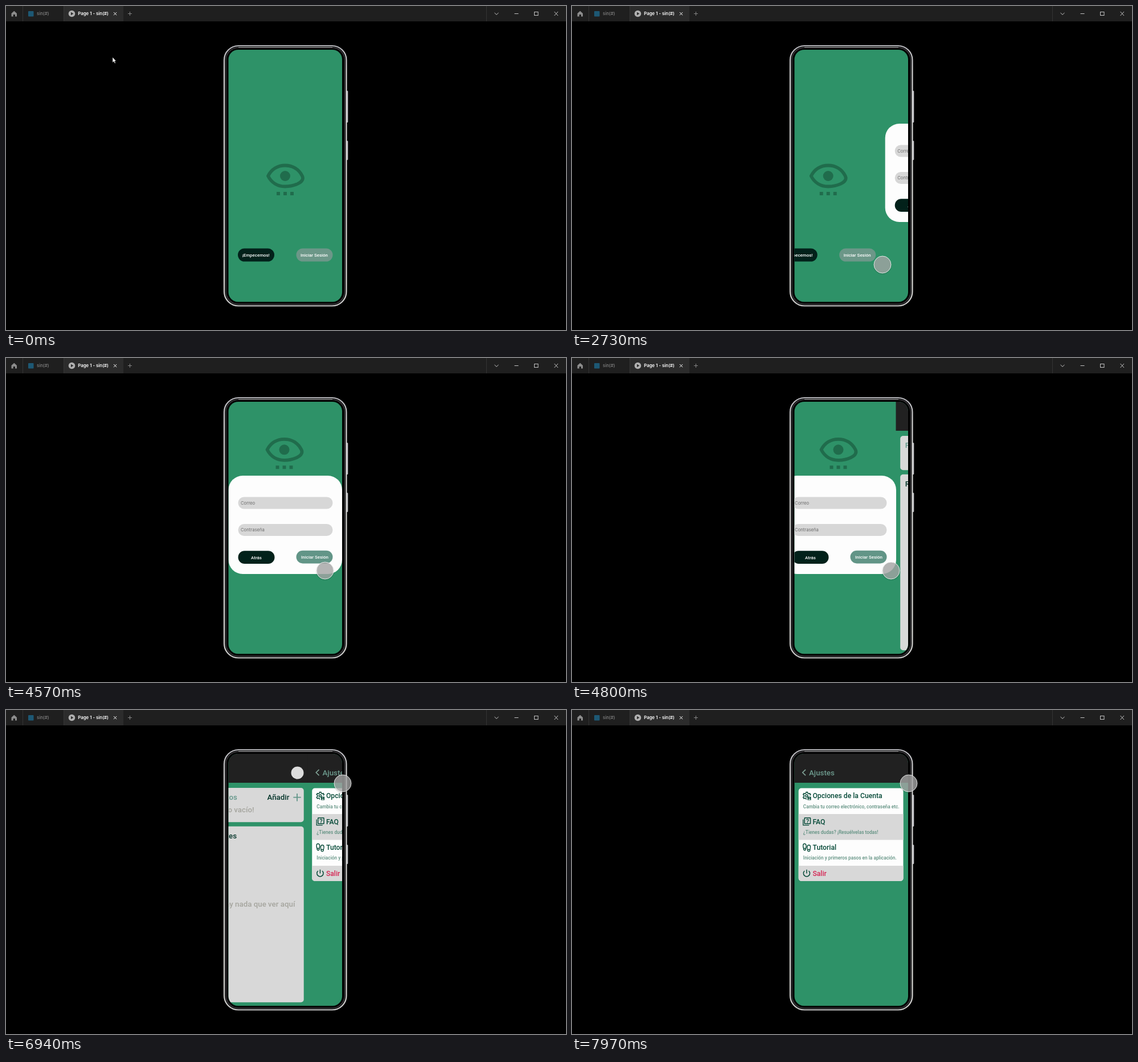
Animation, 983 px wide and 570 px high, one loop 8 s. Source, as an HTML page:

```html
<!DOCTYPE html>
<html lang="es">
<head>
<meta charset="utf-8">
<title>App prototype</title>
<style>
  html, body { margin: 0; width: 100%; height: 100%; overflow: hidden; background: #000; }
  svg { display: block; width: 100%; height: 100%; }
  text { font-family: Roboto, sans-serif; font-weight: 500; white-space: pre; }
  .bar text { font: 600 7.8px Inter, sans-serif; }
  .button { font-size: 7.9px; fill: #fff; text-anchor: middle; }
  .field { font: 400 7.7px Inter, sans-serif; fill: #6b6b6b; }
  .heading { font-size: 13.3px; }
  .item { font-size: 12.2px; fill: #064a38; }
  .note { font-size: 8.3px; fill: #5f9080; }
  .line { fill: none; stroke: #064a38; stroke-width: 1.5; }
  .muted { fill: #a5a59e; }
  .dark { fill: #05352a; }
</style>
</head>
<body>
<svg viewBox="0 0 983 570">
  <defs>
    <clipPath id="screen"><rect x="390.5" y="77" width="199.5" height="443.5" rx="17"/></clipPath>
    <linearGradient id="metal" x2="0" y2="1">
      <stop offset="0" stop-color="#b9b9be"/><stop offset=".1" stop-color="#d2d2d2"/>
      <stop offset=".9" stop-color="#d8d8d4"/><stop offset="1" stop-color="#c8c8c8"/>
    </linearGradient>
    <g id="eye" fill="#206c4c">
      <path d="M-30 0C-24-12-13-18.5 0-18.5S24-12 30 0 13 18.5 0 18.5-24 12-30 0Z"
            fill="none" stroke="#206c4c" stroke-width="5.8" stroke-linejoin="round"/>
      <circle r="9"/>
      <path d="M-15 28h6v6h-6zM-3 28h6v6h-6zM9 28h6v6h-6z"/>
    </g>
  </defs>
  <rect width="983" height="570"/>

  <g class="bar">
    <rect width="983" height="27" fill="#1f1f1f"/>
    <rect x="101" width="105" height="27" fill="#2c2c2c"/>
    <path d="M29.5 0v27M101.5 0v27M843.5 0v27" stroke="#343434"/>
    <path d="M9.5 13 14.3 8.700 19 13v5.500h-3v-3.500h-3.300v3.500h-3.200z" fill="#8c8c8c"/>
    <rect x="39" y="9" width="9.500" height="9.500" rx="1" fill="#1d5874"/>
    <text x="54" y="16.300" fill="#858585" style="font-weight:500">sin(#)</text>
    <circle cx="115.500" cy="13.500" r="5.800" fill="#b0b0b0"/>
    <path d="M114 10.800v5.400l4.400-2.700z" fill="#2c2c2c"/>
    <text x="126.300" y="16.300" fill="#fff">Page 1 - sin(#)</text>
    <g fill="none" stroke="#c4c4c4">
      <path d="m189 11 5.200 5.200m0-5.200L189 16.200" stroke="#fff"/>
      <path d="M217.500 10v7M214 13.500h7" stroke="#858585"/>
      <path d="m857.500 12 3.500 3.300 3.500-3.300M892.500 13.500h7M962.500 10l6.500 7m0-7-6.500 7"/>
      <rect x="927.500" y="10.500" width="6.500" height="6"/>
    </g>
  </g>

  <g fill="none">
    <rect x="596" y="149" width="4.300" height="56" rx="1.500" fill="#c4c4ca"/>
    <rect x="596" y="237" width="4.300" height="34" rx="1.500" fill="#c4c4ca"/>
    <rect x="383" y="70" width="214.500" height="457.500" rx="25" fill="#000" stroke="url(#metal)" stroke-width="2.200"/>
    <rect x="386" y="73" width="208.500" height="451.500" rx="22" stroke="#38373a" stroke-width="1.800"/>
    <path d="M408 72.700H573" stroke="#858585" stroke-width="1.500"/>
  </g>

  <g clip-path="url(#screen)">
    <rect x="390" y="77" width="201" height="444" fill="#2e9268"/>

    <g id="welcome">
      <use href="#eye" x="490" y="299"/>
      <rect x="407" y="426.500" width="64" height="23" rx="11.500" fill="#02211a"/>
      <rect x="509.500" y="426.500" width="64" height="23" rx="11.500" fill="#6c9788"/>
      <text class="button" x="438.700" y="440.800">¡Empecemos!</text>
      <text class="button" x="541" y="440.800">Iniciar Sesión</text>
    </g>

    <g id="login">
      <use href="#eye" x="488.500" y="161.300"/>
      <rect x="390.500" y="207" width="199.500" height="173" rx="25" fill="#fdfdfd"/>
      <rect x="407.500" y="244.500" width="166" height="21" rx="10.500" fill="#d7d7d7"/>
      <rect x="407.500" y="292" width="166" height="21" rx="10.500" fill="#d7d7d7"/>
      <text class="field" x="412" y="257.600">Correo</text>
      <text class="field" x="412" y="305.200">Contraseña</text>
      <rect x="407.500" y="339.300" width="64" height="22.700" rx="11.300" fill="#02211a"/>
      <rect x="509.500" y="338.700" width="64" height="22.700" rx="11.300" fill="#629587"/>
      <text class="button" x="439.500" y="353.500">Atrás</text>
      <text class="button" x="542" y="353">Iniciar Sesión</text>
    </g>

    <g id="home">
      <rect x="390" y="76" width="201" height="52" fill="#212121"/>
      <circle cx="571.500" cy="110.500" r="11" fill="#dcdcdc"/>
      <g fill="#d8d8d8">
        <rect x="397.700" y="137" width="185" height="60.300" rx="5"/>
        <rect x="397.700" y="204.700" width="185" height="309.500" rx="5"/>
      </g>
      <g class="heading">
        <text x="406.300" y="158.200" fill="#63978a">Proyectos</text>
        <text x="518.600" y="158.200" class="dark">Añadir</text>
        <text x="411" y="179.700" class="muted">¡Cuánto vacío!</text>
        <text x="406.300" y="225.800" class="dark">Recientes</text>
        <text x="417.500" y="345.600" class="muted">No hay nada que ver aquí</text>
      </g>
      <path d="M571 147v13.400M564.300 153.700h13.400" stroke="#63978a" stroke-width="1.800"/>
    </g>

    <g id="settings">
      <rect x="390" y="76" width="201" height="52" fill="#212121"/>
      <path d="m410 104.800-5.200 5.200 5.200 5.200" fill="none" stroke="#7fa195" stroke-width="1.700"/>
      <text class="heading" x="416" y="114.500" fill="#6d9a8d">Ajustes</text>
      <rect x="397.700" y="137.500" width="183.800" height="163.500" rx="5" fill="#fdfdfd"/>
      <path d="M397.700 183h183.800v45.500H397.700zM397.700 274h183.800v22a5 5 0 0 1-5 5H402.700a5 5 0 0 1-5-5z" fill="#d8d8d8"/>
      <text class="item" x="422.400" y="155.400">Opciones de la Cuenta</text>
      <text class="note" x="405.800" y="172.500">Cambia tu correo electrónico, contraseña etc.</text>
      <text class="item" x="422.400" y="200.900">FAQ</text>
      <text class="note" x="405.800" y="218">¿Tienes dudas? ¡Resuélvelas todas!</text>
      <text class="item" x="422.400" y="246.400">Tutorial</text>
      <text class="note" x="405.800" y="263.300">Iniciación y primeros pasos en la aplicación.</text>
      <text class="item" x="422.400" y="291.800" style="fill:#d62553">Salir</text>
      <g class="line">
        <path d="M411 157.500v-1.500l-2-1-2 .8-1.300-2.300 1.700-1.300v-2l-1.700-1.300 1.300-2.300 2 .8 1.700-1 .3-2h2.500l.3 2 1.700 1 2-.8 1.300 2.300-1.500 1.200"/>
        <circle cx="412" cy="151" r="2"/>
        <rect x="413.500" y="152.500" width="6" height="6" fill="#064a38" stroke="none"/>
        <path d="M415 157.200h3M416.500 153.500v1.800" stroke="#fdfdfd" stroke-width="1.300"/>
        <rect x="408.200" y="189.800" width="10.300" height="10.300" rx=".7"/>
        <path d="M405.700 192.500v10.200h10.500M411.500 193.500c.3-2 3.800-1.800 3.600.3-.1 1.300-1.700 1.400-1.800 2.800M413.300 197.400v1.300" stroke-width="1.300"/>
        <path d="M406.500 243.500c-1.500-4-1.300-8.300 1.600-8.300 3.200 0 3.600 4.300 2.400 8.300zc0 4.300 4 4.300 4 0M413.500 245.500c-1.300-4-.7-8 2.300-8 3.100 0 3.300 4 2 8zc0 4.500 4.300 4.500 4.300 0" stroke-width="1.400"/>
        <path d="M408.300 283a5.600 5.600 0 1 0 7.200 0M411.900 280.700v6.800"/>
      </g>
    </g>
  </g>

  <path id="arrow" d="M187 90v9.500l2.200-2 1.700 3.400 1.500-.7-1.600-3.300h2.600z" fill="#fff" stroke="#000" stroke-width=".5"/>
  <g id="touch">
    <circle cy="1" r="16" fill="#000" opacity=".12"/>
    <circle r="15" fill="#a9a9a9" fill-opacity=".78" stroke="#fff" stroke-opacity=".8"/>
  </g>
</svg>
<script>
  const LOOP = 8000, SCREEN_WIDTH = 199.5, PUSH_TIME = 800;
  const pages = ["welcome", "login", "home", "settings"].map(id => document.getElementById(id));
  const pushStarts = [2500, 4640, 6650];
  const arrow = document.getElementById("arrow");
  const touch = document.getElementById("touch");
  const ARROW_UNTIL = 500;

  // time, x, y of the pointer centre
  const pointerPath = [
    [0, 202, 105], [300, 202, 105], [1600, 675, 372], [1720, 675, 372],
    [2150, 590, 526], [2450, 545, 455], [3500, 545, 455], [4200, 560, 374],
    [5100, 560, 374], [5640, 573, 130], [6050, 599, 124], [6500, 591, 129], [8000, 591, 129]
  ];

  const ease = u => {
    u = Math.min(1, Math.max(0, u));
    return u * u * (3 - 2 * u);
  };

  function pointerAt(t) {
    const i = pointerPath.findIndex(key => key[0] > t);
    const [t0, x0, y0] = pointerPath[i - 1], [t1, x1, y1] = pointerPath[i];
    const k = ease((t - t0) / (t1 - t0));
    return [x0 + (x1 - x0) * k, y0 + (y1 - y0) * k];
  }

  function draw(now) {
    const t = now % LOOP;
    const position = pushStarts.reduce((sum, start) => sum + ease((t - start) / PUSH_TIME), 0);
    pages.forEach((page, i) => {
      const offset = i - position;
      page.setAttribute("transform", `translate(${offset * SCREEN_WIDTH} 0)`);
      page.style.display = Math.abs(offset) < 1 ? "" : "none";
    });

    const [x, y] = pointerAt(t);
    const isArrow = t < ARROW_UNTIL;
    arrow.style.display = isArrow ? "" : "none";
    touch.style.display = isArrow ? "none" : "";
    arrow.setAttribute("transform", `translate(${x - 202} ${y - 105})`);
    touch.setAttribute("transform", `translate(${x} ${y})`);
  }

  const begin = performance.now();
  function tick() {
    draw(performance.now() - begin);
    requestAnimationFrame(tick);
  }
  tick();
</script>
</body>
</html>
```
